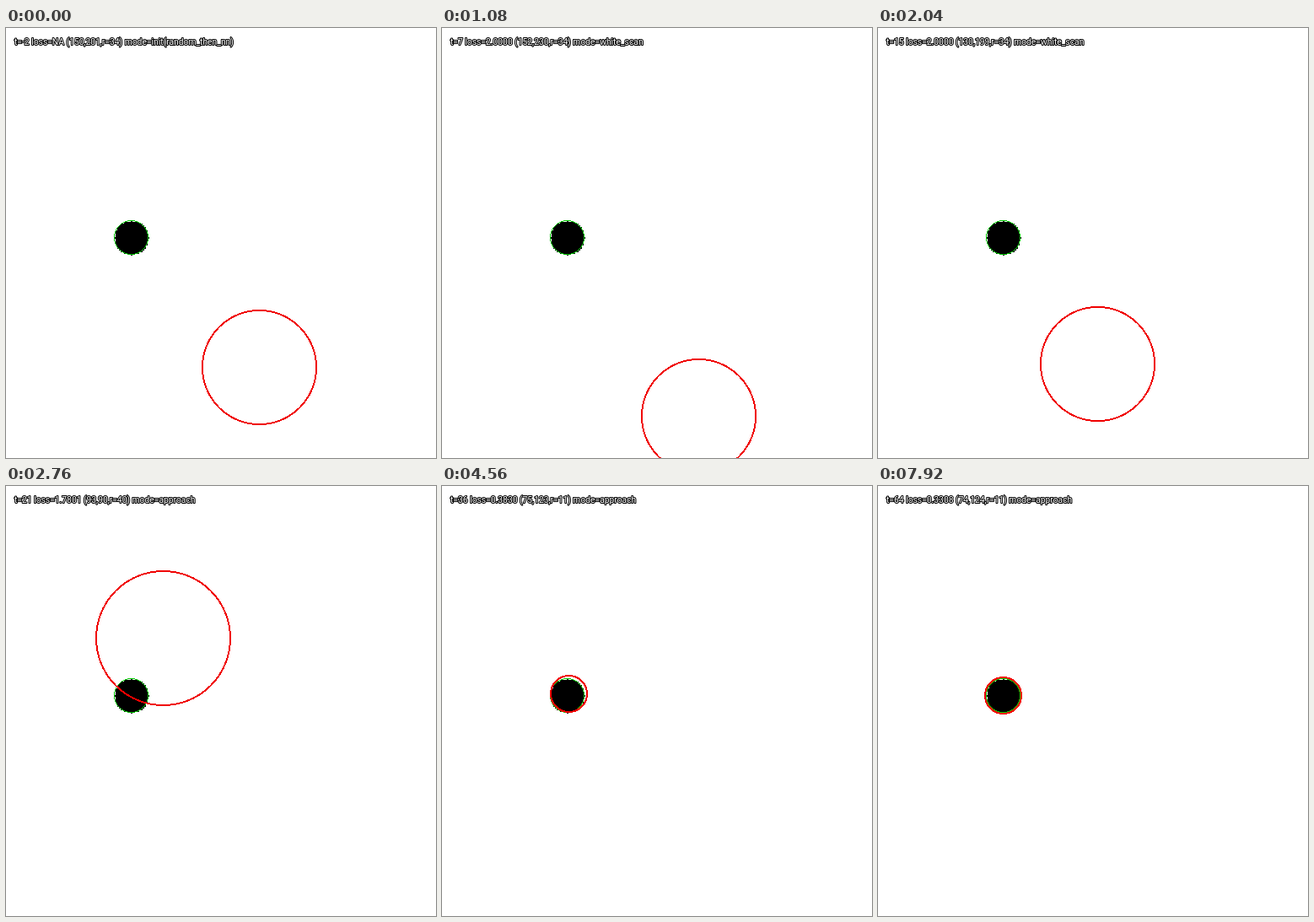
Write an HTML page with a canvas that moves like this. It is 510x510 px and loops after 8000 ms.

```html
<!DOCTYPE html>
<html lang="en">
<head>
<meta charset="utf-8">
<style>
  html, body { margin: 0; width: 100%; height: 100%; overflow: hidden; background: #fff; }
  canvas { display: block; }
</style>
</head>
<body>
<canvas id="stage" width="510" height="510"></canvas>
<script>
const ctx = document.getElementById('stage').getContext('2d');
const LOOP = 8000, STEP = 120, SCALE = 2;
const target = { x: 74, y: 124, r: 10 };

// Search path: step, x, y, radius, loss
const path = [
  [0, 150, 201, 34, 2],
  [7, 153, 222, 34, 2],
  [9, 152, 230, 34, 2],
  [11, 158, 228, 34, 2],
  [14, 138, 221, 34, 2],
  [17, 130, 199, 34, 2],
  [21, 118, 112, 34, 2],
  [23, 93, 90, 40, 1.7801],
  [28, 62, 124, 27, 1.31],
  [35, 75, 124, 14, 0.62],
  [38, 75, 123, 11, 0.383],
  [42, 74, 124, 11, 0.3308],
  [67, 74, 124, 11, 0.3308]
];

function stateAt(step) {
  const i = path.findIndex(key => key[0] > step);
  const a = path[i - 1], b = path[i];
  const k = (step - a[0]) / (b[0] - a[0]);
  const [, x, y, r, loss] = a.map((v, j) => v + (b[j] - v) * k);
  return { x: Math.round(x), y: Math.round(y), r: Math.round(r), loss };
}

// Hard-edged circle made of square cells; inner is the squared radius of the hole
function cells(cx, cy, r, inner, outer, size, color) {
  ctx.fillStyle = color;
  for (let dy = -r; dy <= r; dy++) {
    for (let dx = -r; dx <= r; dx++) {
      const d = dx * dx + dy * dy;
      if (d >= inner && d <= outer) ctx.fillRect((cx + dx) * size, (cy + dy) * size, size, size);
    }
  }
}

function ring({ x, y, r }, width, color) {
  const R = r * SCALE;
  cells(x * SCALE, y * SCALE, R, (R - width + 0.5) ** 2, (R + 0.5) ** 2, 1, color);
}

function label(text) {
  ctx.font = '10.3px Roboto, sans-serif';
  ctx.lineJoin = 'round';
  ctx.lineWidth = 2;
  ctx.strokeStyle = '#000';
  ctx.fillStyle = '#fff';
  ctx.strokeText(text, 10, 20);
  ctx.fillText(text, 10, 20);
}

function draw(time) {
  const step = Math.floor((time % LOOP) / STEP);
  const probe = stateAt(step);
  const starting = step < 2;
  const mode = starting ? 'init(random_then_nn)' : step < 22 ? 'white_scan' : 'approach';
  const loss = starting ? 'NA' : probe.loss.toFixed(4);

  ctx.fillStyle = '#fff';
  ctx.fillRect(0, 0, 510, 510);
  cells(target.x, target.y, target.r, 0, target.r ** 2, SCALE, '#000');
  ring(target, 1, '#00c800');
  ring(probe, 2, '#f00000');
  label(`t=${step - 2} loss=${loss} (${probe.x},${probe.y},r=${probe.r}) mode=${mode}`);
}

const start = performance.now();
function tick() {
  draw(performance.now() - start);
  requestAnimationFrame(tick);
}
tick();
</script>
</body>
</html>
```
